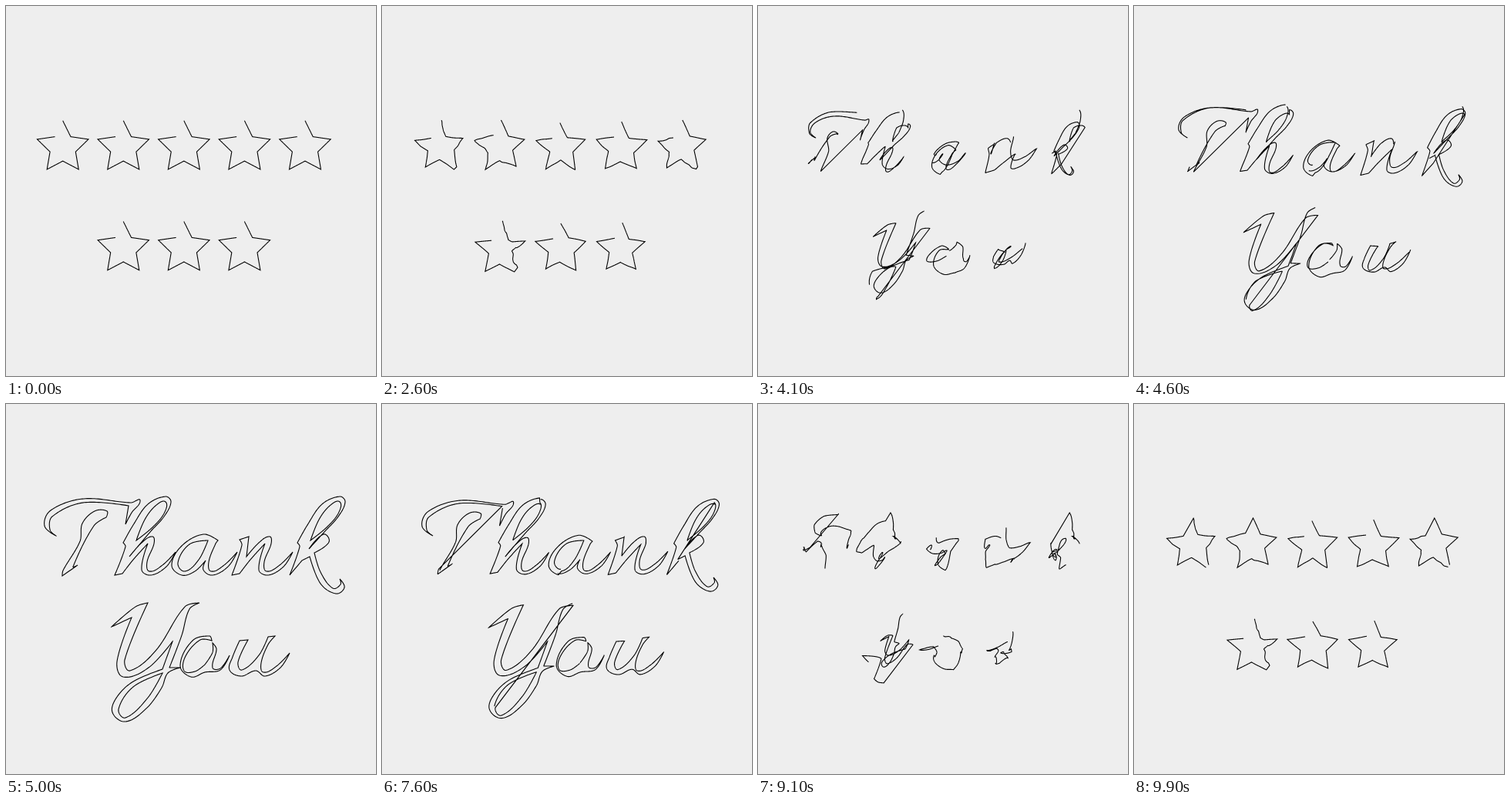
An HTML page for the animation above (10 s loop, 480 by 480 pixels).

```html
<!DOCTYPE html>
<html lang="en">
<head>
<meta charset="utf-8">
<title>Stars to Thank You</title>
<style>
  html, body { margin: 0; width: 100%; height: 100%; overflow: hidden; background: #eee; }
  svg { display: block; width: 100%; height: 100%; }
  path { fill: none; stroke: #000; stroke-width: 1.1; }
</style>
</head>
<body>
<svg viewBox="0 0 480 480"><path id="ink"/></svg>
<script>
const STEPS = 25, EDGE_SAMPLES = 80;

// Key points "x,y"; * marks a sharp corner.
const pen = text => text.split(' ').map(word => {
  const [x, y] = word.split(',').map(parseFloat);
  return { x, y, corner: word.endsWith('*') };
});
const shift = (points, dx, dy = 0) => points.map(p => ({ ...p, x: p.x + dx, y: p.y + dy }));

// Strokes that several letters share, placed as in the h.
const loopHole = pen('207,127 205,142 190,160 169,177* 180,150 194,132');
const loopRight = pen('207,120 214,127 205,146 187,166');
const loopLeft = pen('155,185 152,180* 165,157 184,130');
const arch = pen('160,198* 176,180 190,172');
const tail = pen('192,181 183,205 186,217 203,209 220,192* 208,211 188,222 176,215');
const foot = pen('184,181* 165,202 151,220* 141,222*');
const uTail = shift(tail, 148, 131);

// Outlines of each letter and the star it grows from. "swap" letters draw
// their second outline first on the way back.
const letters = [
  { col: 0, row: 0, swap: true, outlines: [
    pen('159,132* 100,128 60,146 57,163 65,171* 50,158 58,138 100,123 162,128 174,125 163,141 155,156*'),
    pen('74,216 96,178 99,155 115,139 131,139 130,147* 114,158 87,211 93,209* 73,223*')] },
  { col: 1, row: 0, swap: true, outlines: [
    loopHole,
    [...loopRight, ...arch, ...tail, ...foot, ...loopLeft]] },
  { col: 2, row: 0, outlines: [
    pen('232,217 223,206 238,182 262,177* 250,202'),
    [...pen('228,222 215,209 228,184 256,169 275,177*'), ...shift(tail, 80), ...pen('259,203* 245,217')]] },
  { col: 3, row: 0, outlines: [
    [...shift([...tail, ...foot], 152), ...pen('306,183 303,176* 315,172*'), ...shift(arch, 152)]] },
  { col: 4, row: 0, swap: true, outlines: [
    shift(loopHole, 226),
    [...pen('384,203* 368,222*'), ...shift([...loopLeft, ...loopRight], 226),
     ...pen('393,188* 412,169 419,179 400,193* 408,218 424,239 434,234 433,227* 439,238 428,246 408,233 394,198*')]] },
  { col: 1, row: 1, outlines: [
    pen('251,258* 238,266 228,300 212,342* 226,342* 210,349 202,368 182,395 155,412 138,400 144,380 165,360 203,344* '
      + '216,308* 185,342 152,354 144,334 163,277* 137,289* 168,263 184,258* 154,332 161,346 195,319 232,263'),
    pen('146,396 155,407 184,381 203,349* 165,367')] },
  { col: 2, row: 1, outlines: [
    pen('258,338* 268,322 268,310* 273,318 268,342 278,343 290,326* 278,345 258,348 240,354 226,339 '
      + '242,307 264,301 267,307* 252,306 233,327 231,346 245,347')] },
  { col: 3, row: 1, outlines: [
    [...uTail.slice(4), ...pen('305,353 290,345 294,328 303,307* 314,306* 301,335 306,345 328,326 340,302* 349,301*'),
     ...uTail.slice(0, 4)]] }
];

const mix = (a, b, k) => [a[0] + (b[0] - a[0]) * k, a[1] + (b[1] - a[1]) * k];

function starPoint(cx, cy, position) {
  const vertex = i => {
    const radius = i % 2 ? 17.45 : 34.9, angle = i * Math.PI / 5;
    return [cx + radius * Math.sin(angle), cy - radius * Math.cos(angle)];
  };
  const i = Math.floor(position);
  return mix(vertex(i), vertex(i + 1), position - i);
}

// Smooth closed curve through the points, as a function of u in 0..1.
function closedCurve(points) {
  const n = points.length, at = i => points[(i + n) % n];
  const tangents = points.map((p, i) => {
    if (p.corner) return [0, 0];
    const a = at(i - 1), b = at(i + 1), length = Math.hypot(b.x - a.x, b.y - a.y);
    return [(b.x - a.x) / length, (b.y - a.y) / length];
  });
  return u => {
    const i = Math.floor(u * n) % n, s = u === 1 ? 0 : u * n - i;
    const p = at(i), q = at(i + 1), m = tangents[i], w = tangents[(i + 1) % n];
    const chord = Math.hypot(q.x - p.x, q.y - p.y);
    const blend = s * s * (3 - 2 * s);
    const leave = chord * s * (1 - s) ** 2, arrive = chord * s * s * (s - 1);
    return [p.x + (q.x - p.x) * blend + m[0] * leave + w[0] * arrive,
            p.y + (q.y - p.y) * blend + m[1] * leave + w[1] * arrive];
  };
}

// Pair every outline sample with its place on the star's nine open edges.
for (const letter of letters) {
  const cx = 73.7 + letter.col * 78.57, cy = 183.7 + letter.row * 130.8;
  const spans = letter.outlines.length === 2 ? [[0, 4], [4, 9]] : [[0, 9]];
  letter.parts = letter.outlines.map((points, part) => {
    const curve = closedCurve(points), [from, to] = spans[part];
    const count = (to - from) * EDGE_SAMPLES;
    return Array.from({ length: count + 1 }, (_, i) =>
      [starPoint(cx, cy, from + i / EDGE_SAMPLES), curve(i / count)]);
  });
}

function drawLetter(letter, step, back) {
  const parts = letter.parts.map(part => part.map(([star, glyph]) =>
    mix(star, glyph, step / STEPS).map(v => v.toFixed(2)).join()));
  if (step === STEPS) return parts.map(p => 'M' + p.join('L') + 'Z').join('');
  if (back && letter.swap) parts.reverse();
  return 'M' + parts.flat().join('L');
}

const ink = document.getElementById('ink');
let shown = -1;

function frame(now) {
  const tick = Math.floor(now % 10000 / 100);
  if (tick !== shown) {
    const back = tick > 75;
    const step = back ? 100 - tick : Math.min(STEPS, Math.max(0, tick - 25));
    ink.setAttribute('d', letters.map(l => drawLetter(l, step, back)).join(''));
    shown = tick;
  }
  requestAnimationFrame(frame);
}
frame(performance.now());
</script>
</body>
</html>
```
